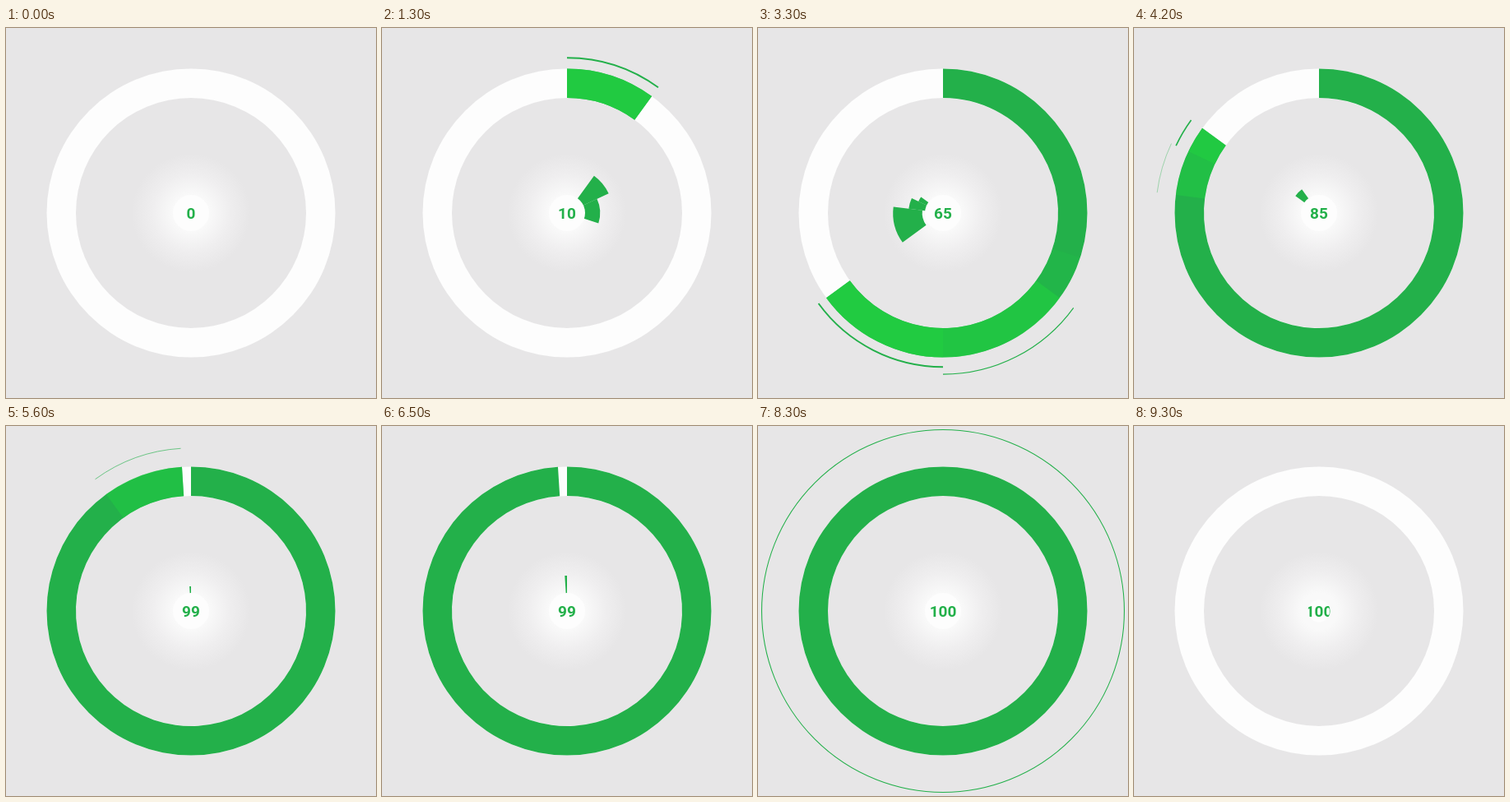
An HTML page with a canvas that plays this animation: 450x450 px, repeating every 9.4 s.

```html
<!DOCTYPE html>
<html lang="en">
<head>
<meta charset="utf-8">
<title>Progress ring</title>
<style>
  html, body { margin: 0; height: 100%; overflow: hidden; background: #e7e6e7; }
  canvas { display: block; }
</style>
</head>
<body>
<canvas id="stage" width="450" height="450"></canvas>
<script>
const ctx = document.getElementById('stage').getContext('2d');
const LOOP = 9400, STEP = 100, C = 225;
const INNER = 140, OUTER = 175.5, THICK = OUTER - INNER;
const HUB = 22, EMERGE = 800, SHOOT = 250, FLASH = 600;
const GREEN = '#23b04a', WHITE = '#fdfdfd';

// Each piece: end percentage and landing time; it starts where the previous one ends.
const pieces = [
  [10, 1200], [18, 1550], [30, 1900], [35, 2800], [50, 3086], [65, 3216],
  [77, 3500], [82, 3860], [85, 4060], [90, 4906], [99, 5300], [100, 7650]
].map(([end, land], i, all) => ({
  start: i ? all[i - 1][0] : 0,
  end, land,
  emerge: end === 100 ? 2500 : EMERGE,
  wave: end === 100 ? { reach: 47, time: 1000, width: 3 } : { reach: 23, time: 400, width: 2.5 }
}));

const clamp = x => Math.min(1, Math.max(0, x));
const angle = percent => (percent / 50 - 0.5) * Math.PI;

function disc(radius, fill) {
  ctx.beginPath();
  ctx.arc(C, C, radius, 0, 2 * Math.PI);
  ctx.fillStyle = fill;
  ctx.fill();
}

function sector(from, to, inner, outer, fill) {
  ctx.beginPath();
  ctx.arc(C, C, outer, angle(from), angle(to));
  ctx.arc(C, C, Math.max(0, inner), angle(to), angle(from), true);
  ctx.fillStyle = fill;
  ctx.fill();
}

function drawFlying(piece, t) {
  const launch = piece.land - SHOOT;
  const out = clamp((t - launch + piece.emerge) / piece.emerge);
  if (!out) return;
  const shot = clamp((t - launch) / SHOOT) ** 2;
  const radius = 20 + 36 * out + (OUTER - 56) * shot;
  sector(piece.start, piece.end, radius - THICK, radius, GREEN);
}

function drawLanded(piece, t) {
  const age = t - piece.land;
  if (age < FLASH) {
    ctx.globalAlpha = 1 - age / FLASH;
    sector(piece.start, piece.end, INNER, OUTER, '#21d040');
    ctx.globalAlpha = 1;
  }
  const { reach, time, width } = piece.wave;
  const p = age / time;
  if (p >= 1) return;
  ctx.beginPath();
  ctx.arc(C, C, OUTER + reach * (1 - (1 - p) ** 3), angle(piece.start === 99 ? 0 : piece.start), angle(piece.end));
  ctx.strokeStyle = GREEN;
  ctx.lineWidth = width * (1 - p);
  ctx.stroke();
}

function draw(t) {
  ctx.fillStyle = '#e7e6e7';
  ctx.fillRect(0, 0, 450, 450);
  sector(0, 100, INNER, OUTER, WHITE);

  const glow = ctx.createRadialGradient(C, C, HUB, C, C, 72);
  glow.addColorStop(0, '#f9f9f9');
  glow.addColorStop(0.5, '#efeeef');
  glow.addColorStop(1, '#e7e6e7');
  disc(72, glow);

  // Everything green is wiped towards the centre at the end of the loop.
  ctx.save();
  if (t > 9000) {
    ctx.beginPath();
    ctx.arc(C, C, Math.max(0, (9325 - t) * 0.54), 0, 2 * Math.PI);
    ctx.clip();
  }
  const landed = pieces.filter(p => t >= p.land);
  const total = landed.length ? landed[landed.length - 1].end : 0;
  if (total) sector(0, total, INNER, OUTER, GREEN);
  landed.forEach(p => drawLanded(p, t));
  pieces.filter(p => t < p.land).forEach(p => drawFlying(p, t));
  disc(HUB, WHITE);
  ctx.fillStyle = GREEN;
  ctx.font = 'bold condensed 19px Roboto, "Liberation Sans", sans-serif';
  ctx.textAlign = 'center';
  ctx.fillText(total, C, 232);
  ctx.restore();
  if (t > 9000) {
    ctx.globalCompositeOperation = 'destination-over';
    disc(HUB, WHITE);
    ctx.globalCompositeOperation = 'source-over';
  }
}

const begin = performance.now();
function frame() {
  const t = (performance.now() - begin) % LOOP;
  draw(Math.floor(t / STEP) * STEP);
  requestAnimationFrame(frame);
}
frame();
</script>
</body>
</html>
```
